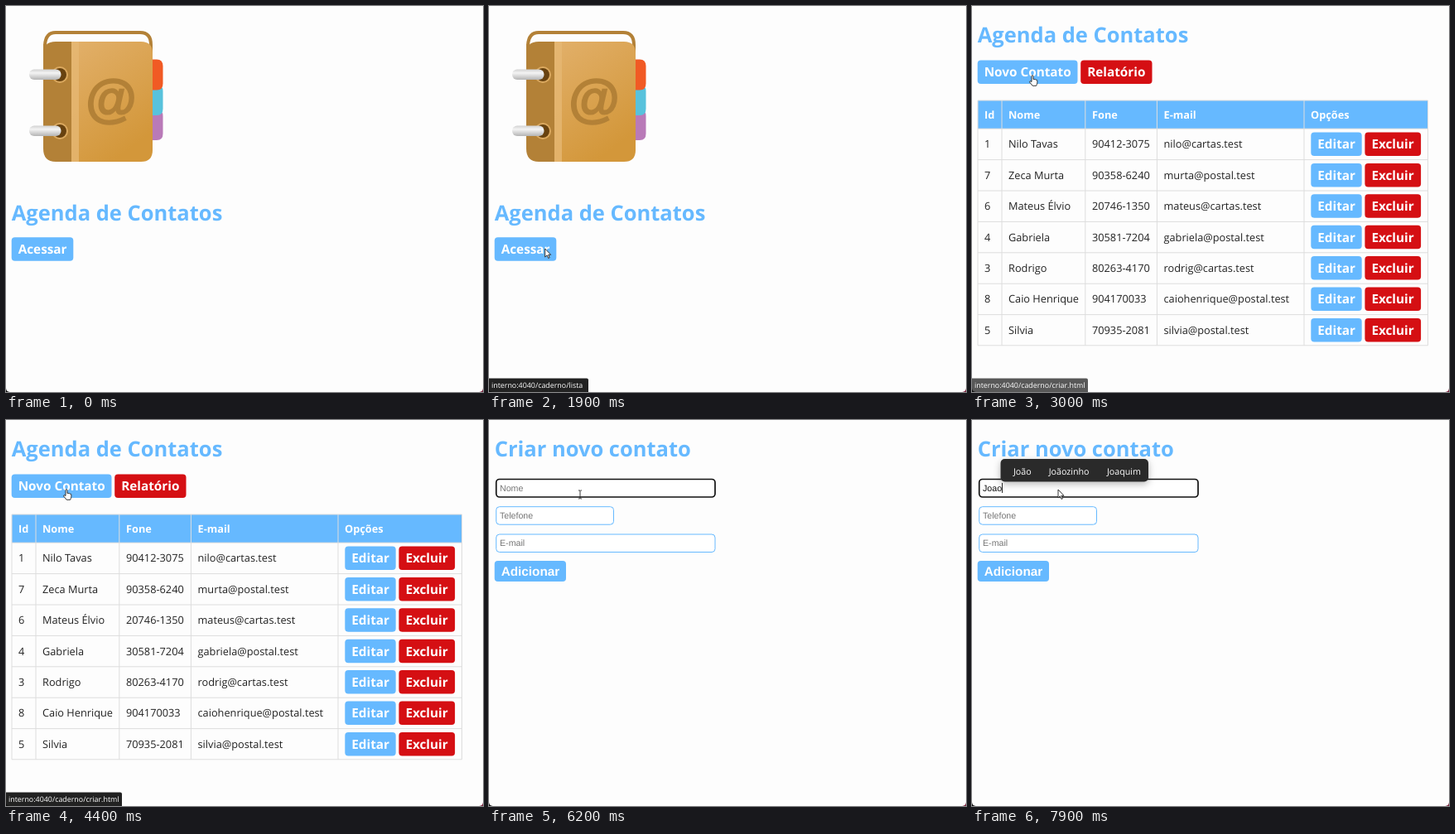
An HTML page for the animation above (8000 ms loop, 576 by 466 pixels).

```html
<!DOCTYPE html>
<html lang="pt-BR">
<head>
<meta charset="utf-8">
<title>Agenda de Contatos</title>
<style>
  html, body { margin: 0; width: 100%; height: 100%; overflow: hidden; background: #fdfdfd; }
  svg { display: block; font-family: "Open Sans", "Noto Sans", sans-serif; text-rendering: geometricPrecision; }
  .form { font-family: "Liberation Sans", Arial, sans-serif; }
  text { white-space: pre; }
</style>
</head>
<body>
<svg id="stage" width="576" height="466" viewBox="0 0 576 466">
  <defs>
    <linearGradient id="cover" x1="0" y1="0" x2=".5" y2="1">
      <stop stop-color="#e2b06a"/><stop offset="1" stop-color="#d3973a"/>
    </linearGradient>
    <linearGradient id="pin" x1="0" y1="0" x2="0" y2="1">
      <stop stop-color="#d2d2d2"/><stop offset=".35" stop-color="#f4f4f4"/><stop offset="1" stop-color="#b4b4b4"/>
    </linearGradient>
    <filter id="shadow" x="-20%" y="-60%" width="140%" height="240%">
      <feDropShadow dx="0" dy="3" stdDeviation="4" flood-opacity=".28"/>
    </filter>
  </defs>
  <g id="view"></g>
  <path d="M0 461.5Q.3 465.7 4.5 466H0Z" fill="#111"/>
  <path d="M576 461.5Q575.7 465.7 571.5 466H576Z" fill="#7d2440"/>
</svg>
<script>
const LOOP = 8000, TICK = 100;
const BLUE = '#66b9ff', RED = '#d50f13', BROWN = '#b38137';
const TITLE = 25.5, LABEL = 15.3, BODY = 12.75, FIELD = 10.63;
const view = document.getElementById('view');
const clamp = v => Math.max(0, Math.min(1, v));

const text = (x, y, s, size = BODY, fill = '#222', weight = 400) =>
  `<text x="${x}" y="${y}" font-size="${size}" fill="${fill}" font-weight="${weight}">${s}</text>`;
const rect = (x, y, w, h, r, fill, extra = '') =>
  `<rect x="${x}" y="${y}" width="${w}" height="${h}" rx="${r}" fill="${fill}" ${extra}/>`;
const path = (d, fill, extra = '') => `<path d="${d}" fill="${fill}" ${extra}/>`;
const title = (y, s) => text(6.7, y, s, TITLE, BLUE, 700);
const button = (x, y, w, s, fill = BLUE, h = 28.5) =>
  rect(x, y, w, h, 4, fill) + text(x + 8, y + h / 2 + 5.7, s, LABEL, '#fff', 700);

function book() {
  const tab = (y, fill) => path(`M176 ${y}H182Q189.5 ${y} 189.5 ${y + 8}V${y + 29}Q189.5 ${y + 37} 182 ${y + 37}H176Z`, fill);
  const ring = y => `<circle cx="65" cy="${y}" r="10" fill="#dcaa60"/><circle cx="65" cy="${y}" r="8" fill="#68420f"/>` +
    rect(28, y - 6.5, 38.5, 12.5, 6, 'url(#pin)');
  return tab(125, '#b97ab8') + tab(95, '#58c2dc') + tab(64.5, '#f15a24') +
    path('M47 58V47Q48 32 60 32H162Q175 32 175 47V58', '#fdfdfd', `stroke="${BROWN}" stroke-width="4"`) +
    path('M79 43H163Q177 43 177 57V174Q177 188 163 188H79Z', 'url(#cover)') +
    path('M79 43H60Q45 43 45 58V172Q45 188 60 188H79Z', BROWN) +
    rect(79, 43, 9, 145, 0, '#e6b873', 'opacity=".8"') +
    `<text class="form" x="127" y="132.5" font-size="63" font-weight="700" fill="${BROWN}" stroke="${BROWN}" stroke-width="1.8" text-anchor="middle">@</text>` +
    ring(83) + ring(151);
}

const home = book() + title(259, 'Agenda de Contatos') + button(6.7, 279.3, 74.6, 'Acessar');

const contacts = [
  [1, 'Nilo Tavas', '90412-3075', 'nilo@cartas.test'],
  [7, 'Zeca Murta', '90358-6240', 'murta@postal.test'],
  [6, 'Mateus Élvio', '20746-1350', 'mateus@cartas.test'],
  [4, 'Gabriela', '30581-7204', 'gabriela@postal.test'],
  [3, 'Rodrigo', '80263-4170', 'rodrig@cartas.test'],
  [8, 'Caio Henrique', '904170033', 'caiohenrique@postal.test'],
  [5, 'Silvia', '70935-2081', 'silvia@postal.test']
];

function list() {
  const columns = [15, 44, 145, 231.5, 409], top = 148.2, pitch = 37.4;
  let s = title(44, 'Agenda de Contatos') + button(6.7, 65.5, 120.8, 'Novo Contato') +
    button(131.2, 65.5, 86.3, 'Relatório', RED) + rect(7, 114, 543.5, 34, 0, BLUE);
  ['Id', 'Nome', 'Fone', 'E-mail', 'Opções'].forEach((h, i) => s += text(columns[i], 135.5, h, BODY, '#fff', 700));
  let lines = 'M7 114H550.5V409.8H7Z';
  for (const x of [36, 136.8, 223.4, 401]) lines += `M${x} 114V409.8`;
  contacts.forEach((row, r) => {
    const y = top + r * pitch;
    lines += `M7 ${y}H550.5`;
    row.forEach((cell, i) => s += text(columns[i], y + 23.2, cell));
    s += button(409.3, y + 4.3, 61.4, 'Editar') + button(474.4, y + 4.3, 67.7, 'Excluir', RED);
  });
  return s + path(lines, 'none', 'stroke="#ddd"');
}
const listPage = list();

function suggestions(left, words) {
  const width = words.at(-1)[0] + 50;
  return rect(left, 47, width, 27.5, 5, '#2b2b2b', 'filter="url(#shadow)"') +
    words.map(([x, w]) => text(left + x, 66, w, 10.7, '#fff')).join('');
}

function form(t) {
  const typed = 'Joao'.slice(0, t < 6700 ? 0 : 1 + Math.floor((t - 6700) / 300));
  const caretX = [13.5, 18.8, 24.7, 30.6, 36.5][typed.length];
  const focused = t >= 5700;
  const caretOn = focused && (t < 6200 || t >= 6700);
  const field = (y, w, hint, active) =>
    rect(8.7, y, w, 21.5, 4, '#fff', active ? 'stroke="#111" stroke-width="1.7"' : `stroke="${BLUE}"`) +
    (hint ? text(13, y + 14, hint, FIELD, '#757575') : '');
  let s = title(44, 'Criar novo contato') + '<g class="form">' +
    field(71.5, 264.3, typed ? '' : 'Nome', focused) + field(104.7, 141.8, 'Telefone') + field(138, 264.3, 'E-mail') +
    button(6.7, 170, 86.3, 'Adicionar', BLUE, 25) + text(13, 85.5, typed, FIELD, '#111');
  if (caretOn) s += rect(caretX - .4, 76, .9, 12, 0, '#111');
  s += '</g>';
  if (t >= 7600) s += suggestions(34.5, [[15.5, 'João'], [58.2, 'Joãozinho'], [128.5, 'Joaquim']]);
  else if (t >= 7100) s += suggestions(caretX, [[15.5, 'João'], [58.2, 'José'], [101, 'Joaquim']]);
  return s;
}

function statusBar(t) {
  const first = t < 2700;
  const alpha = first ? (t < 1900 ? 0 : clamp((2500 - t) / 300))
                      : Math.min(clamp((t - 2700) / 400), clamp((5400 - t) / 400));
  if (!alpha) return '';
  const label = 'interno:4040/caderno/' + (first ? 'lista' : 'criar.html');
  return `<g opacity="${alpha}">` + path(`M0 449.5H${first ? 118 : 138}q2 0 2 2V466H0Z`, '#222') +
    text(3, 461, label, 8.9, '#fff') + '</g>';
}

// Pointer route: time, x, y
const route = [
  [700, 461, 305], [800, 227, 303], [900, 110, 305], [1500, 73, 296], [1700, 68, 293], [2000, 67.5, 293],
  [2700, 70, 70], [3000, 69, 83], [5000, 69, 83], [5500, 110, 90], [7000, 110, 90], [7100, 104, 84], [LOOP, 104, 84]
];
const ARROW = 'M0 0V10L2.4 7.9L4 11.5L5.5 10.8L4 7.3H7Z';
const HAND = 'M3 8.5V1.3Q4 0 5 1.3V5.5Q6 4.8 6.8 5.8Q7.8 5.2 8.4 6.2Q9.6 5.8 9.8 7.2V9.5Q9.6 11.5 8.6 13.3H4.2L.8 9.2Q.2 7.6 1.6 7.6Z';
const BEAM = 'M-2 -5H-.6L0 -4.4L.6 -5H2M0 -4.4V4.4M-2 5H-.6L0 4.4L.6 5H2';

function pointer(t) {
  if (t < route[0][0]) return '';
  const i = route.findIndex(p => p[0] > t);
  const [t0, x0, y0] = route[i - 1], [t1, x1, y1] = route[i];
  const k = (t - t0) / (t1 - t0);
  const beam = t >= 5100 && t < 7100;
  const hand = (t >= 1400 && t < 1900) || (t >= 2700 && t < 4800);
  return `<g transform="translate(${x0 + (x1 - x0) * k} ${y0 + (y1 - y0) * k})">` +
    path(beam ? BEAM : hand ? HAND : ARROW, beam ? 'none' : '#fff', 'stroke="#222" stroke-width=".9"') + '</g>';
}

let shown = -1;
function frame(now) {
  const t = Math.floor(now % LOOP / TICK) * TICK;
  if (t !== shown) {
    shown = t;
    view.innerHTML = (t < 2000 ? home : t < 4800 ? listPage : form(t)) + statusBar(t) + pointer(t);
  }
  requestAnimationFrame(frame);
}
frame(performance.now());
</script>
</body>
</html>
```
